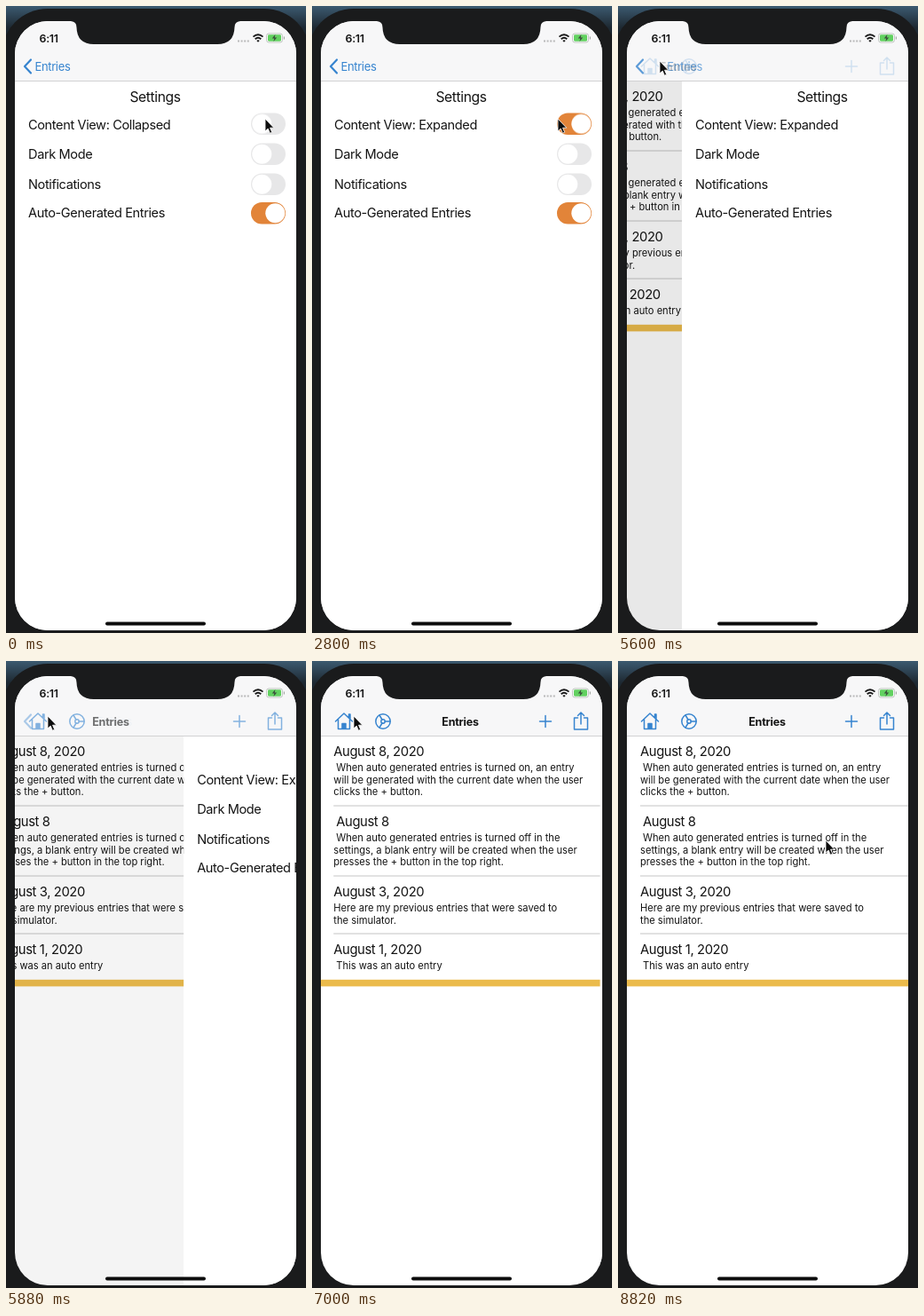
Animation of 338x706 px, one loop 8.89 s. Source, as an HTML page:

```html
<!DOCTYPE html>
<html lang="en">
<head>
<meta charset="utf-8">
<title>Journal settings</title>
<style>
  /* --p: progress of the page slide, 0 = settings, 1 = entries */
  @property --p { syntax: "<number>"; inherits: true; initial-value: 0; }

  html, body { margin: 0; width: 100%; height: 100%; overflow: hidden; background: #1a1b1c; }
  svg { display: block; width: 100vw; height: 100vh; animation: slide 8890ms infinite; }

  text { font-family: Inter, Roboto, sans-serif; fill: #141414; }
  .row { font-size: 14.6px; letter-spacing: -.4px; }
  .heading { font-size: 15.7px; letter-spacing: -.4px; text-anchor: middle; }
  .date { font-size: 14.8px; letter-spacing: -.4px; }
  .body { font-size: 11.15px; }
  .clock { font-size: 12.4px; font-weight: 600; letter-spacing: -.3px; }
  .nav-title { font-size: 12.5px; font-weight: 700; letter-spacing: -.2px; text-anchor: middle; }
  .back-label { font-size: 13px; letter-spacing: -.35px; fill: #3684cf; }
  .icon { fill: none; stroke: #3684cf; stroke-width: 1.5; stroke-linecap: round; stroke-linejoin: round; }
  .rule { stroke: #c4c4c4; }

  .settings { transform: translateX(calc(var(--p) * 317px)); }
  .entries { transform: translateX(calc((var(--p) - 1) * 95px)); }
  .shade { opacity: calc((1 - var(--p)) * .11); }
  .incoming { opacity: var(--p); }
  .outgoing { opacity: calc(1 - var(--p)); }
  .nav-title { transform: translateX(calc((var(--p) - 1) * 125px)); opacity: var(--p); }
  .back-label { transform: translateX(calc(var(--p) * 116px)); opacity: calc(1 - var(--p) * 1.6); }

  .track { animation: track 8890ms infinite; }
  .knob { animation: knob 8890ms infinite; }
  .collapsed { animation: collapsed 8890ms step-end infinite; }
  .expanded { animation: expanded 8890ms step-end infinite; }
  .cursor { animation: cursor 8890ms ease-in-out infinite; }

  @keyframes slide {
    0% { --p: 0; }
    60.93% {
      --p: 0;
      animation-timing-function: linear(0, .09, .264, .442, .594, .713, .801, .864, .908,
        .939, .96, .973, .983, .989, .993, .996, 1);
    }
    81.57%, 100% { --p: 1; }
  }
  @keyframes track {
    0%, 3.94% { fill: #e7e7e8; }
    6.75%, 100% { fill: #e28439; }
  }
  @keyframes knob {
    0%, 3.94% { transform: translateX(0); }
    6.75%, 100% { transform: translateX(15px); }
  }
  @keyframes collapsed { 0% { opacity: 1; } 4.73%, 100% { opacity: 0; } }
  @keyframes expanded { 0% { opacity: 0; } 4.73%, 100% { opacity: 1; } }
  @keyframes cursor {
    0%, 17.32% { transform: translate(292px, 127px); }
    28.35%, 40.94% { transform: translate(277px, 127px); }
    51.97%, 83.46% { transform: translate(47px, 62px); }
    94.49%, 100% { transform: translate(234px, 202px); }
  }
</style>
</head>
<body>
<svg viewBox="0 0 338 706" preserveAspectRatio="none">
  <defs>
    <linearGradient id="desk" x2="0" y2="1">
      <stop offset="0" stop-color="#3c5a70"/>
      <stop offset=".035" stop-color="#1d2831"/>
      <stop offset="1" stop-color="#16191c"/>
    </linearGradient>
    <clipPath id="screen"><rect x="10" y="17" width="317" height="686" rx="37"/></clipPath>
    <g id="off">
      <rect width="39" height="24.5" rx="12.25" fill="#e7e7e8"/>
      <circle cx="12.3" cy="12.25" r="11" fill="#fff"/>
    </g>
    <g id="on">
      <rect width="39" height="24.5" rx="12.25" fill="#e28439"/>
      <circle cx="27.3" cy="12.25" r="11" fill="#fff"/>
    </g>
  </defs>

  <rect width="338" height="706" fill="url(#desk)"/>
  <rect x="-5" y="3" width="348" height="760" rx="52" fill="#1a1b1c"/>

  <g clip-path="url(#screen)">
    <rect x="10" y="17" width="317" height="686" fill="#fff"/>

    <g class="entries">
      <text class="date" x="25" y="106.5">August 8, 2020</text>
      <text class="body" x="28" y="124">When auto generated entries is turned on, an entry</text>
      <text class="body" x="25" y="137.5">will be generated with the current date when the user</text>
      <text class="body" x="25" y="151">clicks the + button.</text>

      <text class="date" x="28" y="185.5">August 8</text>
      <text class="body" x="28" y="203">When auto generated entries is turned off in the</text>
      <text class="body" x="25" y="216.5">settings, a blank entry will be created when the user</text>
      <text class="body" x="25" y="230">presses the + button in the top right.</text>

      <text class="date" x="25" y="264.5">August 3, 2020</text>
      <text class="body" x="25" y="282">Here are my previous entries that were saved to</text>
      <text class="body" x="25" y="295.5">the simulator.</text>

      <text class="date" x="25" y="329.5">August 1, 2020</text>
      <text class="body" x="28" y="347">This was an auto entry</text>

      <path class="rule" d="M25 163H327M25 242H327M25 307H327"/>
      <rect x="10" y="358.8" width="317" height="7.6" fill="#ebbb4c"/>
    </g>
    <rect class="shade" x="10" y="85" width="317" height="618"/>

    <g class="settings">
      <rect x="10" y="85" width="317" height="618" fill="#fff"/>
      <text class="heading" x="168" y="107.5">Settings</text>
      <text class="row collapsed" x="25" y="138.5">Content View: Collapsed</text>
      <text class="row expanded" x="25" y="138.5">Content View: Expanded</text>
      <text class="row" x="25" y="171.5">Dark Mode</text>
      <text class="row" x="25" y="205.5">Notifications</text>
      <text class="row" x="25" y="237.5">Auto-Generated Entries</text>
      <g transform="translate(276 120.5)">
        <rect class="track" width="39" height="24.5" rx="12.25"/>
        <circle class="knob" cx="12.3" cy="12.25" r="11" fill="#fff"/>
      </g>
      <use href="#off" x="276" y="154.5"/>
      <use href="#off" x="276" y="188.5"/>
      <use href="#on" x="276" y="221"/>
    </g>

    <rect x="10" y="17" width="317" height="68" fill="#f7f7f8"/>
    <path d="M10 84.5H327" stroke="#d2d2d3"/>

    <path class="icon outgoing" d="M28 60.5L21 68L28 75.5" style="stroke-width:2.2"/>
    <text class="back-label" x="32.5" y="72.5">Entries</text>
    <text class="nav-title" x="168" y="72.5">Entries</text>

    <g class="icon incoming">
      <path d="M26.5 68L36 59L45.5 68M29.5 66V76.5H42.5V66M41.5 63.5V60H43V65"/>
      <path d="M34 76V70.5H38V76" fill="#3684cf"/>
      <circle cx="80" cy="68" r="8.2"/>
      <circle cx="80" cy="68" r="2.2"/>
      <path d="M82.2 68H88M79 66L76 61M79 70L76 75"/>
      <path d="M256.5 68H269.5M263 61.5V74.5"/>
      <path d="M299.5 64H295.5V77H310.5V64H306.5M303 71V58.5M299.5 61.5L303 58L306.5 61.5"/>
    </g>

    <text class="clock" x="37.5" y="41">6:11</text>
    <path d="M261 39.5H274" stroke="#b9b9ba" stroke-width="2" stroke-dasharray="2 1.6"/>
    <g fill="none" stroke="#181818" stroke-width="1.9">
      <path d="M278.5 34.6Q284 29.8 289.5 34.6M280.7 37.2Q284 34.4 287.3 37.2"/>
      <path d="M284 40.8L282.3 38.9Q284 37.7 285.7 38.9Z" fill="#181818" stroke="none"/>
    </g>
    <rect x="293.5" y="31" width="18" height="10" rx="2.6" fill="#f7f7f8" stroke="#b4b9b4" stroke-width=".8"/>
    <rect x="295" y="32.3" width="15" height="7.4" rx="1.4" fill="#62d160"/>
    <path d="M303.4 32L299.8 36.6H302.3L301.4 40L305.2 35.4H302.7Z" fill="#3b4a3b"/>
    <path d="M313.4 34.5V37.5" stroke="#a9aea9" stroke-width="1.2"/>

    <path d="M73 16V17Q79.5 17.5 79.5 24Q80 43 99 43H238Q257 43 257.5 24Q257.5 17.5 264 17V16Z" fill="#1a1b1c"/>
    <rect x="112" y="693.4" width="113" height="4" rx="2" fill="#0c0c0c"/>
  </g>

  <path class="cursor" d="M0 0V14L3.2 11.1L5.4 16.2L7.7 15.2L5.5 10.2H9.8Z"
    fill="#0c0c0c" stroke="#fff" stroke-width=".8" stroke-linejoin="round"/>
</svg>
</body>
</html>
```
